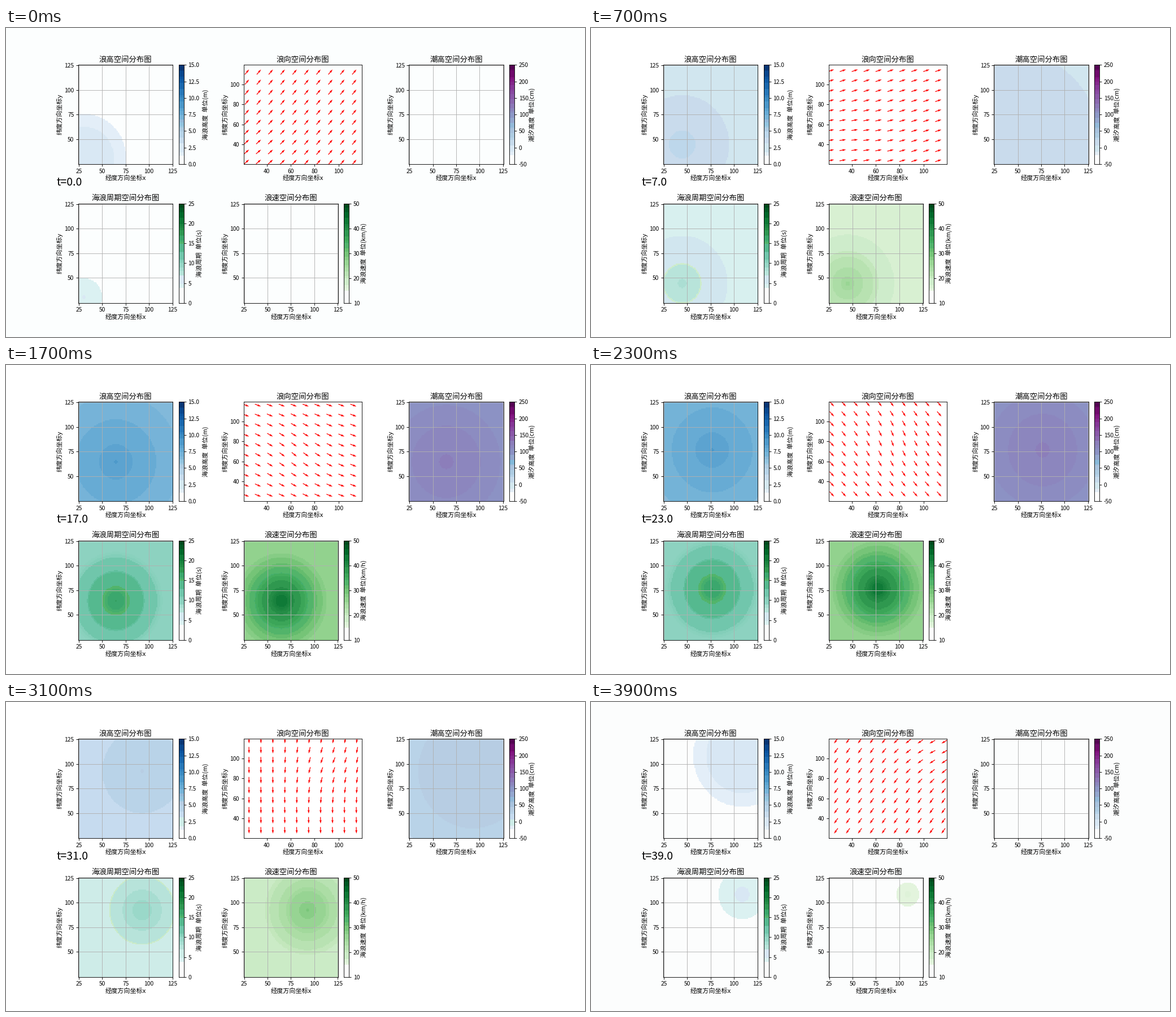
A matplotlib script that plays this animation: 1025 by 547 pixels, repeating every 4 s.

```python
import matplotlib.pyplot as plt
import numpy as np
from matplotlib.animation import FuncAnimation

W, H, DPI = 1025, 547, 80
FRAMES, CLIMAX = 40, 20
plt.rcParams.update({
    "font.family": ["Noto Sans CJK JP", "DejaVu Sans"],
    "axes.unicode_minus": False,
    "font.size": 10,
    "xtick.labelsize": 9.2,
    "ytick.labelsize": 9.2,
})

# Panel layout in pixels, measured from the top left.
LEFT, TOP = 0.125 * W, 0.12 * H - 0.2
CELL_W, CELL_H = 0.775 * W / 3.8, 0.77 * H / 2.4
PITCH_X, PITCH_Y = 1.4 * CELL_W, 1.4 * CELL_H

fig = plt.figure(figsize=(W / DPI, H / DPI), dpi=DPI)


def add_axes(x, y, w, h):
    return fig.add_axes([x / W, 1 - (y + h) / H, w / W, h / H])


def label(x, y, text, size=10, rotation=0, ha="center"):
    return fig.text(x / W, 1 - y / H, text, fontsize=size, rotation=rotation,
                    ha=ha, va="center")


def add_panel(col, row, width, title):
    x, y = LEFT + col * PITCH_X, TOP + row * PITCH_Y
    ax = add_axes(x, y, width, CELL_H)
    mid = x + width / 2
    label(mid, y - 10, title, 12)
    label(mid, y + CELL_H + 25, "经度方向坐标x")
    label(x - 33, y + CELL_H / 2, "纬度方向坐标y", rotation=90)
    return ax


class Field:
    """A colour-mapped cone around the storm centre, with its colour bar.

    peak and slope are quadratics in the time distance from the climax.
    """
    ramp = np.linspace(0, 1, 256)[:, None]

    def __init__(self, col, row, title, unit, unit_dx, cmap, ticks, peak,
                 slope, reach, fmt="{:.0f}"):
        self.cmap = plt.get_cmap(cmap)
        self.low, self.high = ticks[0], ticks[-1]
        self.peak, self.slope, self.reach = peak, slope, reach

        self.ax = add_panel(col, row, 0.8 * CELL_W, title)
        blank = np.full((101, 101, 3), 255, np.uint8)
        self.image = self.ax.imshow(blank, origin="lower", aspect="auto",
                                    extent=(24.5, 125.5, 24.5, 125.5),
                                    interpolation="nearest")
        self.ax.set_xticks(range(25, 126, 25))
        self.ax.set_yticks(range(50, 126, 25))
        self.ax.grid(True)

        x, y = LEFT + col * PITCH_X, TOP + row * PITCH_Y
        bar = add_axes(x + 0.85 * CELL_W, y, CELL_H / 20, CELL_H)
        self.bar = bar.imshow(self.bar_colors(), origin="lower", aspect="auto",
                              extent=(0, 1, self.low, self.high),
                              interpolation="nearest")
        bar.set_xticks([])
        bar.yaxis.tick_right()
        bar.set_yticks(ticks, [fmt.format(v) for v in ticks])
        label(x + unit_dx, y + CELL_H / 2, unit, rotation=90)

    def bar_colors(self):
        return self.cmap(self.ramp, bytes=True)[..., :3]

    def colors(self, age, dist):
        value = (np.polyval(self.peak, age)
                 - np.polyval(self.slope, age) * np.minimum(dist, self.reach))
        level = (value - self.low) / (self.high - self.low)
        return self.cmap(np.clip(level, 0, 1), bytes=True)[..., :3]


fields = [
    Field(0, 0, "浪高空间分布图", "海浪高度  单位(m)", 225, "Blues",
          np.arange(0, 15.1, 2.5), peak=(0.0117, -0.597, 10.17),
          slope=(0.000105, -0.0018, 0.03), reach=70, fmt="{:.1f}"),
    Field(2, 0, "潮高空间分布图", "潮汐高度  单位(cm)", 218, "BuPu",
          np.arange(-50, 251, 50), peak=(0.079, -11.28, 154),
          slope=(0.00068, -0.0235, 0.345), reach=200),
    Field(0, 1, "海浪周期空间分布图", "海浪周期  单位(s)", 214, "BuGn",
          np.arange(0, 26, 5), peak=(0.0213, -1.196, 20.4),
          slope=(0.00028, -0.0109, 0.168), reach=50),
    Field(1, 1, "浪速空间分布图", "海浪速度  单位(km/h)", 213, "Greens",
          np.arange(10, 51, 10), peak=(0.0182, -2.13, 50.2),
          slope=(0.00046, -0.0252, 0.419), reach=50),
]

arrow_ax = add_panel(1, 0, CELL_W, "浪向空间分布图")
arrow_ax.set(xlim=(20.5, 119.5), ylim=(20.5, 119.5),
             xticks=range(40, 101, 20), yticks=range(40, 101, 20))
ARROW_X, ARROW_Y = np.meshgrid(np.arange(25, 116, 10), np.arange(25, 116, 10))
arrows = arrow_ax.quiver(ARROW_X, ARROW_Y, np.ones((10, 10)),
                         np.zeros((10, 10)), color="red", pivot="tip",
                         scale=18, width=0.006)
clock = label(90, 273.5, "", 17.5, ha="left")

GRID_X, GRID_Y = np.meshgrid(np.arange(25, 126), np.arange(25, 126))
PANEL_PX, BAR_PX = 0.8 * CELL_W * CELL_H, CELL_H ** 2 / 20
PAPER_PX = 425000


def posterize(images, areas):
    """Give every colour the area-weighted mean of its coarse RGB bin."""
    rgb = np.concatenate([im.reshape(-1, 3) for im in images]).astype(int)
    weight = np.concatenate([np.full(im.size // 3, 3 * area / im.size)
                             for im, area in zip(images, areas)])
    key = (rgb[:, 0] >> 5) * 128 + (rgb[:, 1] >> 4) * 8 + (rgb[:, 2] >> 5)
    total = np.bincount(key, weight, 1024)
    total[total == 0] = 1
    mean = np.stack([np.bincount(key, weight * rgb[:, c], 1024) / total
                     for c in range(3)], axis=1)
    flat = np.rint(mean[key]).astype(np.uint8)
    ends = np.cumsum([im.size // 3 for im in images])[:-1]
    return [part.reshape(im.shape)
            for part, im in zip(np.split(flat, ends), images)]


def wave_angle(t, dist):
    """Waves turn clockwise, further ahead the closer they are to the storm."""
    far = 50 - 4.5 * t + 6 * np.exp(-((t - CLIMAX) / 8) ** 2)
    lead = (10 + t / 2) * np.clip(1 - dist / 50, 0, 1)
    return np.radians(far - lead)


def update(t):
    center = 30.5 + 2 * t
    dist = np.hypot(GRID_X - center, GRID_Y - center)
    images = [f.colors(abs(t - CLIMAX), dist) for f in fields]
    images += [f.bar_colors() for f in fields]
    images.append(np.full((1, 1, 3), 255, np.uint8))
    *flat, paper = posterize(images, [PANEL_PX] * 4 + [BAR_PX] * 4 + [PAPER_PX])

    for field, panel, bar in zip(fields, flat[:4], flat[4:]):
        field.image.set_data(panel)
        field.bar.set_data(bar)
    paper = tuple(paper[0, 0] / 255)
    fig.set_facecolor(paper)
    arrow_ax.set_facecolor(paper)

    angle = wave_angle(t, np.hypot(ARROW_X - center, ARROW_Y - center))
    arrows.set_UVC(np.cos(angle), np.sin(angle))
    clock.set_text(f"t={t:.1f}")
    return []


anim = FuncAnimation(fig, update, frames=FRAMES, interval=100, repeat=True,
                     repeat_delay=0)
plt.show()
```
